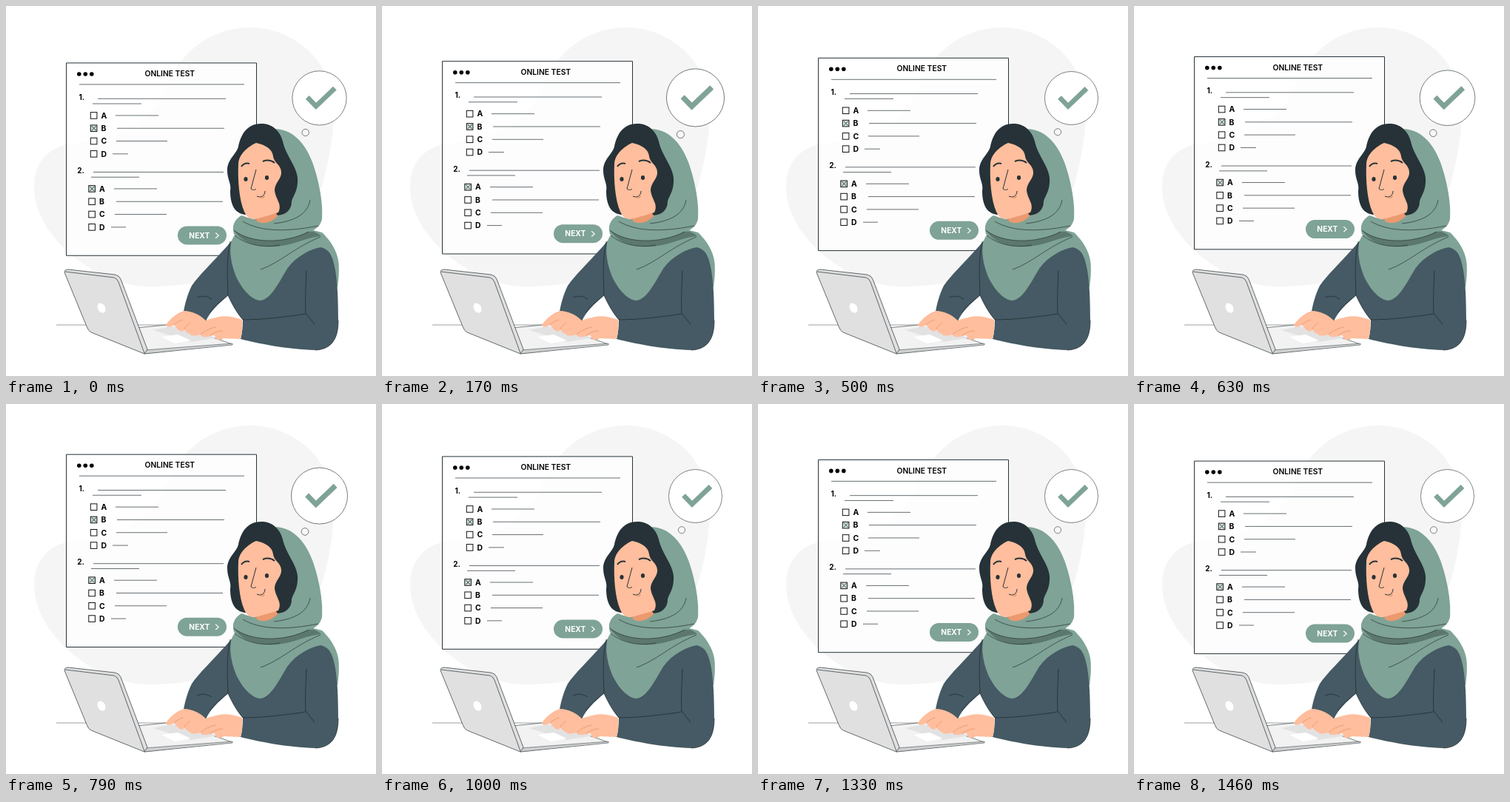
Write an HTML page with a canvas that moves like this. It is 500 px wide and 500 px high and loops after 1.5 s.

```html
<!DOCTYPE html>
<html lang="en">
<head>
<meta charset="utf-8">
<title>Online test</title>
<style>
html, body { margin: 0; width: 100%; height: 100%; overflow: hidden; background: #fff; }
canvas { display: block; width: 500px; height: 500px; }
</style>
</head>
<body>
<canvas id="stage"></canvas>
<script>
const LOOP = 1500, LEAD = 25;
const INK = '#263238', GREEN = '#7fa396', DEEP = '#5c786e', CLOTH = '#455a64',
      SKIN = '#ffbe9d', BLUSH = '#eb996e', GREY = '#e0e0e0';

const canvas = document.getElementById('stage');
const ctx = canvas.getContext('2d');
const ratio = window.devicePixelRatio || 1;
canvas.width = canvas.height = 500 * ratio;

function shape(d, fill, stroke, width = 0.7) {
  const path = new Path2D(d);
  if (fill) { ctx.fillStyle = fill; ctx.fill(path); }
  if (stroke) { ctx.strokeStyle = stroke; ctx.lineWidth = width; ctx.stroke(path); }
}

function oval(x, y, rx, ry, fill, stroke, width = 0.7, turn = 0) {
  ctx.beginPath();
  ctx.ellipse(x, y, rx, ry, turn, 0, Math.PI * 2);
  if (fill) { ctx.fillStyle = fill; ctx.fill(); }
  if (stroke) { ctx.strokeStyle = stroke; ctx.lineWidth = width; ctx.stroke(); }
}

const line = (x1, x2, y) => shape(`M${x1} ${y}H${x2}`, null, INK, 0.7);

function label(text, x, y, size, color = '#000', align = 'left', weight = 700) {
  ctx.font = `${weight} ${size}px Inter, sans-serif`;
  ctx.fillStyle = color;
  ctx.textAlign = align;
  ctx.textBaseline = 'alphabetic';
  ctx.fillText(text, x, y);
}

function backdrop() {
  shape('M330 29C388 29 443 74 443 140C443 185 432 230 420 265C390 340 290 379 195 379' +
    'C120 379 38 310 38 245C38 205 65 187 95 185C160 180 200 150 218 108C236 60 280 29 330 29Z', '#f5f5f5');
  shape('M68 431H230', null, '#777', 0.7);
}

// One question: number, two text lines and four answers
function question(q) {
  label(q.no, q.x, q.y + 3.5, 10);
  line(...q.long, q.y + 2);
  line(...q.short, q.y + 8.8);
  q.answers.forEach(([from, to], i) => {
    const y = q.first + i * 17.3, x = q.box;
    const picked = i === q.picked;
    ctx.fillStyle = picked ? '#dfe8e5' : '#fff';
    ctx.strokeStyle = '#111';
    ctx.lineWidth = 1;
    ctx.fillRect(x, y - 4.3, 8.6, 8.6);
    ctx.strokeRect(x, y - 4.3, 8.6, 8.6);
    if (picked) shape(`M${x + 1.5} ${y - 3}l6 6m0 -6l-6 6`, null, DEEP, 1.2);
    label('ABCD'[i], x + 14.2, y + 3.8, 10.4);
    line(from, to, y);
  });
}

const questions = [
  { no: '1.', x: 98.5, y: 123.3, long: [124, 297], short: [117, 183], box: 114.3, first: 148, picked: 1,
    answers: [[148, 206], [150, 295], [149, 218], [144, 165]] },
  { no: '2.', x: 96.3, y: 222.5, long: [118, 294], short: [115, 180], box: 111.8, first: 247, picked: 0,
    answers: [[146, 204], [149, 293], [147, 217], [142, 162]] }
];

function testWindow(rise) {
  ctx.save();
  ctx.translate(0, 0.3 - rise);
  shape('M81.5 77H338.5V337.3H81.5Z', 'rgba(255,255,255,.8)', INK, 1);
  for (const x of [98.8, 107.3, 115.8]) oval(x, 92, 2.8, 2.8, '#000');
  label('ONLINE TEST', 221.3, 95.2, 10.3, '#000', 'center', 600);
  line(99, 322, 106);
  questions.forEach(question);
  ctx.beginPath();
  ctx.roundRect(232, 297.5, 66, 25, 12.5);
  ctx.fillStyle = GREEN;
  ctx.fill();
  label('NEXT', 261.3, 313.8, 10.2, '#fff', 'center');
  shape('M283.2 306.6l4 3.6l-4 3.6', null, '#fff', 1.2);
  ctx.restore();
}

function bubble(scale) {
  ctx.save();
  ctx.translate(423.5, 131.5);
  ctx.scale(scale, scale);
  ctx.translate(-423.5, -131.5);
  oval(423.5, 124.5, 36, 36, '#fff', INK, 0.6);
  oval(405, 170.3, 4.6, 4.6, '#f8f8f8', INK, 0.6);
  shape('M407.5 123.5L419 135.3L444 111.5', null, GREEN, 6.6);
  ctx.restore();
}

function body() {
  shape('M362 166C385 166 403 182 414 211C422 233 429 265 427 288C425 296 421 300 415 303' +
    'C433 312 446 328 449 346C451 358 449 372 448 380L320 330L340 230Z', GREEN);
  shape('M306 316C286 340 262 362 251 378C245 390 242 402 240 413C248 412 262 418 270 426' +
    'C276 412 286 404 300 391C305 402 312 415 320 424C320 434 319 443 317 450' +
    'C340 456 380 464 418 465C440 464 449 450 449 425C449 385 447 345 436 332C430 326 425 325 410 325Z', CLOTH);
  shape('M303 318C298 340 299 365 300 391C305 402 312 415 320 424M300 391C290 399 281 406 276 414' +
    'M406 358C405 380 404 400 405 415L417 430M405 416C380 420 345 424 320 424' +
    'M449 425C449 450 440 464 418 465M258 394C266 391 272 392 278 396', null, '#1d282d');
}

function scarf() {
  shape('M318 283C308 289 304 299 309 310C300 320 302 345 312 368C322 388 335 398 344 398' +
    'C358 396 368 375 380 355C392 338 412 328 426 326C437 327 445 340 449 356C452 342 444 322 427 306' +
    'L415 303L424 295L400 262L372 272C366 290 348 297 336 289Z', GREEN);
  shape('M308 303C330 321 376 322 409 305C416 304 422 307 426 311C402 313 384 327 352 325C330 324 315 315 308 303Z', DEEP);
  shape('M411 262C408 281 390 291 362 294M320 291C345 306 382 305 422 297M308 303C330 321 376 322 409 305' +
    'M344 356C372 346 390 326 425 312M309 310C326 324 350 327 370 323', null, INK, 0.7);
}

function head() {
  shape('M338 280L370 262L367 284C360 292 348 296 339 291Z', BLUSH);
  shape('M347 159C325 158 317 175 314 190C311 201 299 207 299 222C299 235 305 240 303 250' +
    'C303 268 309 281 324 282L345 250L367 283C379 282 386 275 386 264C388 256 395 250 394 232' +
    'C392 215 378 202 374 183C371 171 362 160 347 159Z', INK);
  shape('M338 185C327 190 315 200 314 213C313 235 315 262 322 278C326 287 333 290 341 287' +
    'C352 284 361 281 368 279C374 268 364 261 363 249C363 239 373 233 372 224' +
    'C371 214 362 212 361 203C360 194 352 188 338 185Z', SKIN);
  shape('M318 217C321 213 325 212 329 213M347 210C352 208 358 208 363 212', null, INK, 2);
  oval(324, 234, 2.6, 3, INK);
  oval(352.5, 232, 2.6, 3, INK);
  shape('M344 260C347 261 350 259 350 256Z', BLUSH);
  shape('M338 221L331 247C333 249 336 249 338 247M339 257C345 260 350 256 350 250', null, INK, 1);
}

function laptop() {
  shape('M176 435L226 430L306 457L187 470Z', '#f2f2f2', INK, 0.6);
  shape('M199 438L224 433L286 448L250 454Z', '#e2e2e2');
  shape('M210 447L232 444L250 452L228 456Z', '#fff');
  shape('M187 465L306 456V458L187 470Z', '#d0d0d0', INK, 0.5);
  shape('M79 360Q79 356 84 356L147 363Q153 364 155 369L191 464L187 470L115 441Q111 439 109 433Z', GREY, INK, 0.7);
  shape('M80 359L146 367Q150 368 152 373L187 469', null, INK, 0.7);
  oval(129, 408, 5, 7, '#fff', null, 0, -0.5);
}

function hands() {
  shape('M241 412C232 414 222 422 216 431C217 435 222 434 227 431L232 437C236 441 240 440 241 437' +
    'C245 444 252 445 254 440C260 436 263 431 270 425C262 417 250 412 241 412Z', SKIN);
  shape('M319 424C306 419 294 418 284 421C272 423 264 428 259 433C253 437 247 441 249 444' +
    'C252 447 258 445 263 444C264 448 270 448 275 446L282 445C283 452 290 453 294 449C300 449 308 450 317 450' +
    'C319 443 320 434 319 424Z', SKIN);
  shape('M227 431C231 427 235 425 239 424M241 437C243 432 246 430 249 428' +
    'M263 444C270 438 277 435 284 434M275 446C281 441 287 439 293 439', null, BLUSH, 0.9);
}

// Two beats per loop: slow release after the first, quick after the second
function beat(p) {
  if (p < 0.1) return p / 0.1;
  if (p < 0.3) return (0.3 - p) / 0.2;
  return Math.max(0, 1 - Math.abs(p - 0.5) / 0.1);
}

function draw() {
  const p = ((performance.now() + LEAD) % LOOP) / LOOP;
  ctx.setTransform(ratio, 0, 0, ratio, 0, 0);
  ctx.fillStyle = '#fff';
  ctx.fillRect(0, 0, 500, 500);
  backdrop();
  testWindow(10 * (1 - Math.abs(2 * p - 1)));
  bubble(1 + 0.1 * beat(p));
  body();
  scarf();
  head();
  laptop();
  hands();
  requestAnimationFrame(draw);
}
draw();
</script>
</body>
</html>
```
